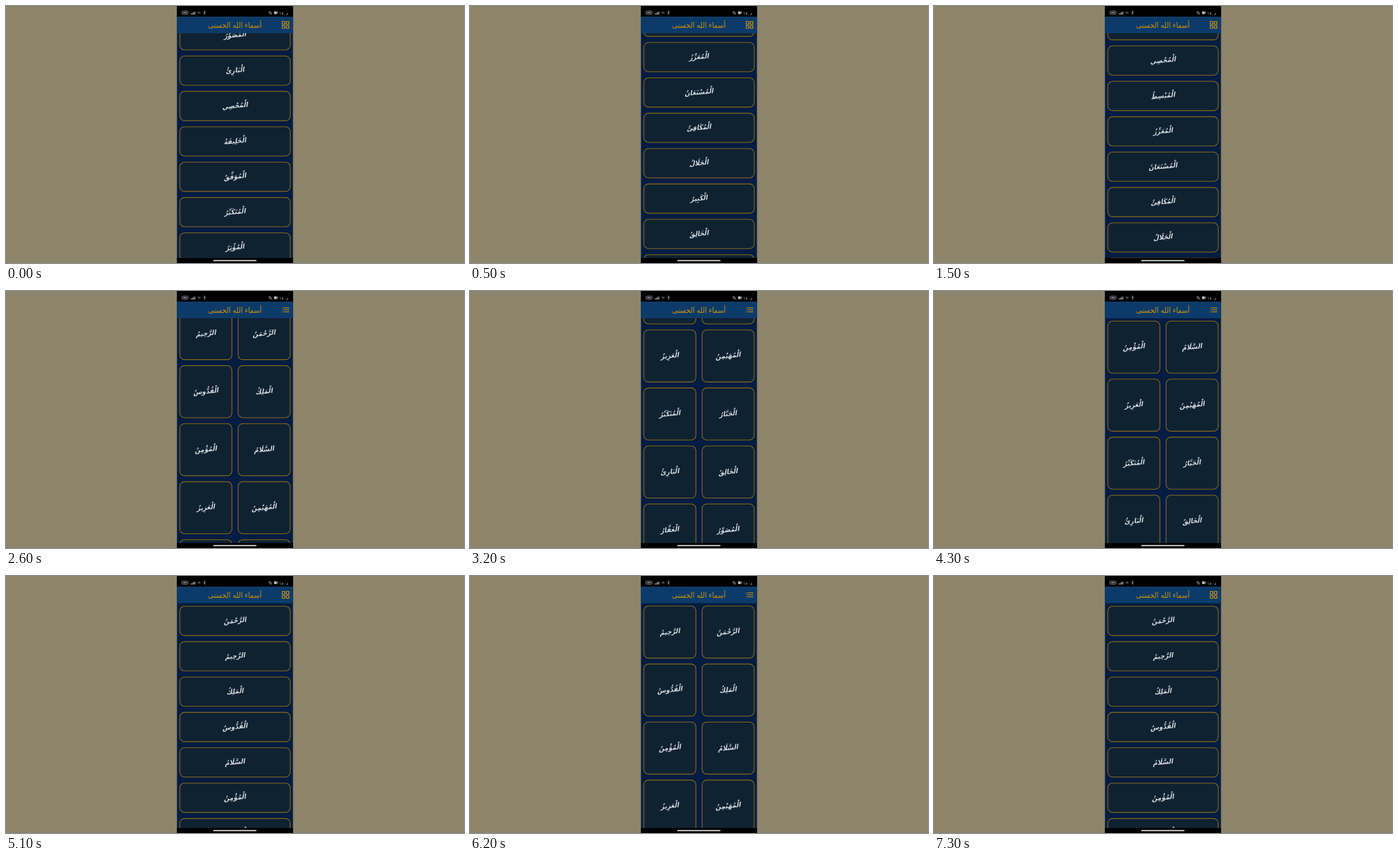
These frames come from a looping animation (692x388 px, 7.5 s). An HTML page with a canvas:

```html
<!DOCTYPE html>
<html lang="ar">
<head>
<meta charset="utf-8">
<style>
  html, body { margin: 0; width: 100%; height: 100%; overflow: hidden; background: #8c856b; }
  canvas { display: block; }
</style>
</head>
<body>
<canvas id="stage" width="692" height="388"></canvas>
<script>
const ctx = document.getElementById('stage').getContext('2d');
const LOOP = 7500, STEP = 100;
const GOLD = '#8c6a1a', BRIGHT = '#cf930f', PALE = '#b4b6b8';
const FONT = '"DejaVu Sans Condensed", "DejaVu Sans", sans-serif';

const names = ('الرَّحْمَنُ الرَّحِيمُ الْمَلِكُ الْقُدُّوسُ السَّلَامُ الْمُؤْمِنُ الْمُهَيْمِنُ الْعَزِيزُ الْجَبَّارُ الْمُتَكَبِّرُ ' +
  'الْخَالِقُ الْبَارِئُ الْمُصَوِّرُ الْغَفَّارُ الْقَهَّارُ الْوَهَّابُ الرَّزَّاقُ الْفَتَّاحُ الْعَلِيمُ الْقَابِضُ').split(' ');
const laterNames = ('الْوَدُودُ الْمُحْصِي الْمُبْسِطُ الْمُعَزِّزُ الْمُسْتَعَانُ الْمُكَافِئُ الْجَلَالُ الْكَبِيرُ الْخَالِقُ ' +
  'الْمُصَوِّرُ الْبَارِئُ الْمُحْصِي الْخَلِيفَةُ الْمُوَفِّقُ الْمُتَكَبِّرُ الْمُؤْثِرُ').split(' ');

// Each fling: start, end, from, to
const listFlings = [[0, 800, 0, 373], [850, 1500, 373, 465.4]];
const gridFlings = [[2580, 3300, 0, 250], [3350, 4100, 250, 455], [4150, 4700, 455, 0]];

function scrollAt(t, flings) {
  let pos = 0;
  for (const [start, end, from, to] of flings) {
    if (t < start) break;
    const p = Math.min(1, (t - start) / (end - start));
    pos = from + (to - from) * (1 - (1 - p) ** 3);
  }
  return pos;
}

function rect(x, y, w, h, color) {
  ctx.fillStyle = color;
  ctx.fillRect(x, y, w, h);
}

function text(str, x, y, font, color) {
  ctx.font = `${font} ${FONT}`;
  ctx.fillStyle = color;
  ctx.fillText(str, x, y);
}

function line(points, color = PALE, width = 0.8) {
  ctx.beginPath();
  points.forEach(([x, y]) => ctx.lineTo(x, y));
  ctx.strokeStyle = color;
  ctx.lineWidth = width;
  ctx.stroke();
}

function card(x, y, w, h, name) {
  if (y > 382 || y + h < 40) return;
  ctx.beginPath();
  ctx.roundRect(x, y, w, h, 7);
  ctx.fillStyle = '#0f2232';
  ctx.fill();
  ctx.strokeStyle = GOLD;
  ctx.lineWidth = 1.1;
  ctx.stroke();
  ctx.save();
  ctx.translate(x + w / 2, y + h / 2 + 3);
  ctx.transform(1, -0.1, -0.15, 1, 0, 0);   // gentle calligraphic slant
  text(name, 0, 0, 'bold 10.5px', '#d4dae0');
  ctx.restore();
}

function drawList(items, top) {
  items.forEach((name, i) => card(262.7, top + i * 53.4, 166.7, 44.2, name));
}

function drawGrid(scroll) {
  names.forEach((name, i) =>
    card(i % 2 ? 262.7 : 350.7, 45.3 + (i >> 1) * 87.6 - scroll, 78.6, 78.6, name));
}

function statusBar() {
  rect(258.3, 0, 175.3, 16, '#000');
  ctx.strokeStyle = PALE;
  ctx.lineWidth = 0.7;
  ctx.beginPath();
  ctx.roundRect(265.8, 7.8, 9.4, 4.6, 1.5);
  ctx.stroke();
  rect(267.5, 9.2, 6, 1.8, '#8a8c8e');
  for (let i = 0; i < 4; i++) rect(279 + i * 1.9, 11.4 - i, 1.2, 1.4 + i, PALE);
  for (const r of [1.5, 3.3]) {
    ctx.beginPath();
    ctx.arc(291.7, 12.5, r, -2.35, -0.8);
    ctx.stroke();
  }
  line([[298.4, 8.6], [301.4, 11.4], [299.9, 12.8], [299.9, 7.2], [301.4, 8.6], [298.4, 11.4]], PALE, 0.6);
  ctx.beginPath();
  ctx.arc(399.3, 10.4, 1.8, 0, 7);
  ctx.stroke();
  line([[397, 8], [401.6, 12.7]]);
  rect(405, 8.2, 4, 4, PALE);
  line([[411, 8.4], [409, 10.2], [411, 12]], PALE, 1);
  text('م ٦:٥٠', 419.5, 12.5, '5.5px', PALE);
}

function header(gridShown) {
  rect(258.3, 16, 175.3, 25, '#0d3b69');
  text('أسماء الله الحسنى', 346, 32.5, '11.5px', BRIGHT);
  for (let i = 0; i < 3 && gridShown; i++) {
    rect(417, 25 + i * 3, 1.3, 1, BRIGHT);
    rect(419.3, 25 + i * 3, 8.7, 1, BRIGHT);
  }
  if (gridShown) return;
  ctx.strokeStyle = BRIGHT;
  ctx.lineWidth = 1.1;
  for (const x of [417.4, 423.5])
    for (const y of [23.5, 29.6]) ctx.strokeRect(x, y, 4, 4);
}

function draw(t) {
  const gridShown = (t >= 2000 && t < 4900) || (t >= 5500 && t < 6900);
  rect(0, 0, 692, 388, '#8c856b');
  rect(258.3, 0, 175.3, 388, '#051d42');
  ctx.direction = 'rtl';
  ctx.textAlign = 'center';
  if (gridShown) drawGrid(t < 4900 ? scrollAt(t, gridFlings) : 0);
  else if (t < 2000) drawList(laterNames, -458.5 + scrollAt(t, listFlings));
  else drawList(names, 45.7);
  header(gridShown);
  statusBar();
  rect(258.3, 380.5, 175.3, 8, '#000');
  ctx.beginPath();
  ctx.roundRect(313, 383.6, 65.5, 1.6, 0.8);
  ctx.fillStyle = '#e4e4e4';
  ctx.fill();
}

function tick() {
  const t = performance.now() % LOOP;
  draw(Math.floor(t / STEP) * STEP);
  requestAnimationFrame(tick);
}
tick();
</script>
</body>
</html>
```
